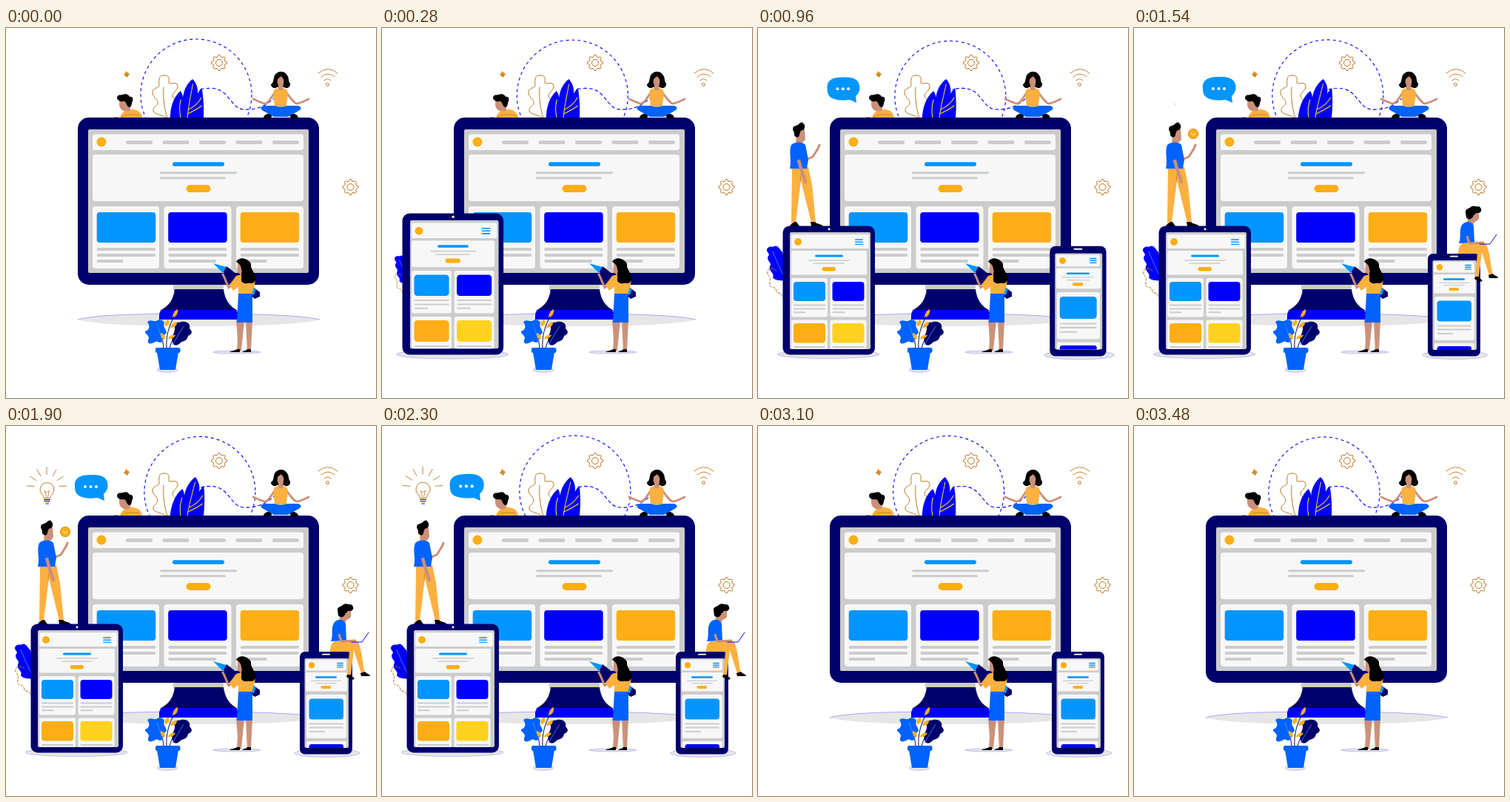
Write an HTML page that moves like this. It is 500 by 500 pixels and loops after 3500 ms.

```html
<!DOCTYPE html>
<html lang="en">
<head>
<meta charset="utf-8">
<title>Responsive devices</title>
<style>
html, body { margin: 0; width: 100%; height: 100%; overflow: hidden; background: #fff; }
svg { display: block; width: 500px; height: 500px; }
</style>
</head>
<body>
<svg id="stage" viewBox="0 0 500 500"></svg>
<script>
const LOOP = 3500;
const NAVY = '#00006c', BLUE = '#0000ff', LAKE = '#0062ff', SKY = '#0095ff',
  ORANGE = '#fdae17', CLOTH = '#fcb040', YELLOW = '#ffd21f', GREY = '#ccc', PANEL = '#f7f7f7',
  SHADE = '#e6e6e6', SKIN = '#cc9078', BROWN = '#b97526', BLACK = '#000';

// Drawing helpers; boxes are given by their edges.
const box = (x, y, x2, y2, fill, r = 0) =>
  `<rect x="${x}" y="${y}" width="${x2 - x}" height="${y2 - y}" rx="${r}" fill="${fill}"/>`;
const bar = (x, x2, y, h = 3, fill = GREY) => box(x, y - h / 2, x2, y + h / 2, fill, h / 2);
const dot = (x, y, r, fill) => `<circle cx="${x}" cy="${y}" r="${r}" fill="${fill}"/>`;
const ring = (x, y, r, color, extra = '') =>
  `<circle cx="${x}" cy="${y}" r="${r}" fill="none" stroke="${color}" ${extra}/>`;
const oval = (x, y, rx, ry, fill, extra = '') =>
  `<ellipse cx="${x}" cy="${y}" rx="${rx}" ry="${ry}" fill="${fill}" ${extra}/>`;
const shadow = (x, y, rx, ry) => oval(x, y, rx, ry, SHADE, 'stroke="#8a8af0" stroke-width=".5"');
const shape = (d, fill) => `<path d="${d}" fill="${fill}"/>`;
const line = (d, color, w = 1, extra = '') =>
  `<path d="${d}" fill="none" stroke="${color}" stroke-width="${w}" stroke-linecap="round" stroke-linejoin="round" ${extra}/>`;
const group = (id, body) => `<g id="${id}">${body}</g>`;

function gear(x, y) {
  let d = '';
  for (let i = 0; i < 32; i++) {
    const r = i % 4 < 2 ? 10.6 : 8.2, a = (i - 0.5) * Math.PI / 16;
    d += (i ? 'L' : 'M') + (x + r * Math.cos(a)).toFixed(1) + ' ' + (y + r * Math.sin(a)).toFixed(1);
  }
  return line(d + 'Z', BROWN) + ring(x, y, 4.5, BROWN);
}

function monitor() {
  let s = shape('M97 394C120 387 190 386 260 386S400 388 424 394C400 401 330 403 260 403S120 401 97 394Z', SHADE) +
    line('M97 394C120 387 190 386 260 386S400 388 424 394', '#8a8af0', .7) +
    box(226, 346, 294, 355, GREY) +
    shape('M228 353H294C296 367 301 375 313 382H208C221 375 226 367 228 353Z', NAVY) +
    shape('M211 381H310Q314 383 314 388V394H207V388Q207 383 211 381Z', BLUE) +
    box(97, 121, 423, 347, NAVY, 15) + box(111, 137, 409, 331, GREY, 2) +
    box(117, 143.5, 402, 165, PANEL, 3) + dot(129, 154, 6.5, ORANGE);
  for (let i = 0; i < 5; i++) s += bar(162 + i * 49.5, 198 + i * 49.5, 154.5, 5);
  s += box(117, 171, 402, 234, PANEL, 4) + bar(225, 295, 184, 5.5, SKY) +
    bar(208, 312, 195.7) + bar(208, 297, 202.8) + box(243.5, 212, 276.5, 222, ORANGE, 5);
  [[117, 207, SKY, 36], [213.5, 304.5, BLUE, 65], [311, 402, ORANGE, 36]].forEach(([x, x2, fill, w]) => {
    const a = x + 5.7;
    s += box(x, 241, x2, 325, PANEL, 4) + box(a, 249, a + 79.5, 290, fill, 4) +
      bar(a, a + 79.5, 299, 4) + bar(a, a + 79.5, 307, 4) + bar(a, a + w, 315, 4);
  });
  return s;
}

const menu = (x, x2, y, gap) => [0, 1, 2].map(i => bar(x, x2, y + i * gap, 1.4, SKY)).join('');

function tablet() {
  let s = shadow(95, 441, 69, 5.5) + box(33.5, 267.5, 158, 441.5, NAVY, 9) + dot(96, 271.7, 1.5, '#fff') +
    box(43, 276, 152, 434, GREY, 2) + box(45, 279, 150, 298, PANEL, 2) + dot(54, 289, 5, ORANGE) +
    menu(131, 142, 286, 3.2) + box(45, 301, 147, 333.5, PANEL, 2) + bar(77, 115, 308, 3, SKY) +
    bar(68, 124, 314, 1.5) + bar(74, 117, 318, 1.5) + box(86.5, 323, 105, 328.5, ORANGE, 2.7);
  [[45, SKY, ORANGE], [97.5, BLUE, YELLOW]].forEach(([x, top, low]) => {
    const a = x + 3;
    s += box(x, 338, x + 49, 390.5, PANEL, 3) + box(a, 343, a + 43, 369, top, 4) +
      bar(a, a + 43, 374.5, 2) + bar(a, a + 43, 379.5, 2) + bar(a, a + 17, 384.3, 2) +
      box(x, 394.5, x + 49, 434, PANEL, 3) + box(a, 399, a + 43, 425.5, low, 4) + bar(a, a + 43, 431, 2);
  });
  return s;
}

function phone() {
  return shadow(434, 442, 44, 5.5) + box(397, 305, 468, 443.5, NAVY, 7) + bar(427, 438, 308.7, 1.8, '#fff') +
    box(403.5, 314, 463, 435, GREY, 2) + box(405, 316, 460, 330.5, PANEL, 2) + dot(413, 323.3, 4.2, ORANGE) +
    menu(447, 456, 320.5, 2.7) + box(405, 333, 461, 358.5, PANEL, 2) + bar(418, 447, 339.5, 2.4, SKY) +
    bar(412, 453, 344.3, 1.2) + bar(418, 447, 347.7, 1.2) + box(425.5, 351, 439, 355, ORANGE, 2) +
    box(406, 363, 460, 422, PANEL, 3) + box(409.5, 368.5, 456, 396.5, SKY, 4) +
    bar(409.5, 456, 402.5, 2) + bar(409.5, 456, 407.5, 2) + bar(409.5, 431, 413, 2) +
    box(406, 426, 460, 435, PANEL, 2) + shape('M409.5 435V433Q410 430 413 430H453Q456 430 456 433V435Z', BLUE);
}

const leaves = () =>
  shape('M222 122C222 110 226 94 237 85C239 88 240 91 240 94C242 83 246 75 254 69C260 76 261 83 260 89C262 85 264 83 266 81C268 95 268 110 267 122Z', BLUE) +
  line('M236 121C234 112 235 104 237 97M245 121C247 105 251 90 254 76M247 110C254 107 261 101 265 94M246 116C254 112 260 109 265 105', YELLOW, 1.1);

const sketch = () => line('M216 121C208 116 199 117 199 111C199 106 206 105 205 100C204 95 197 92 198 86C199 80 207 82 207 77C206 69 207 64 213 64C220 63 221 68 220 73C219 78 231 71 232 78C233 84 225 87 225 92C226 97 232 96 231 103C230 110 222 113 222 121M218 121C214 110 212 95 213 80', BROWN);

const peeker = () =>
  shape('M154 122C155 114 162 110 170 110C179 110 184 115 184 122Z', CLOTH) +
  shape('M153 96H167L168 111C161 115 154 111 153 104Z', SKIN) +
  shape('M150 94C151 89 156 91 158 90C162 88 166 90 167 93C171 92 173 97 170 101C170 106 167 109 165 106C162 104 163 99 159 99C155 100 150 98 150 94Z', BLACK) +
  line('M156 121C161 117 169 116 180 118', BROWN, .8) + oval(149, 121.5, 3, 1.8, SKIN);

const yogi = () =>
  line('M365 85C358 93 355 103 349 102C345 101 341 99 334 96M377 85C384 93 389 103 394 102C399 101 403 99 409 96', SKIN, 2.8) +
  shape('M362 84C365 80 377 80 380 84C382 92 379 99 379 106H363C363 99 360 92 362 84Z', CLOTH) +
  shape('M358 76C362 74 361 69 363 64C367 57 377 58 379 63C383 66 381 72 384 75C385 80 379 83 376 80H366C363 83 358 80 358 76Z', BLACK) +
  shape('M368 75H374.5V82C372 85 370 85 368 82Z', SKIN) +
  oval(371, 72.5, 4.3, 7, SKIN) + shape('M365 70C368 68 371 66 372 64C374 68 376 69 377 72L380 64L371 59L364 63Z', BLACK) +
  shape('M348 121C349 116 355 115 360 116L358 122H350ZM395 121C394 116 388 115 383 116L385 122H393Z', BLACK) +
  shape('M363 105L348 105Q342 108 346 111L362 120H381L397 111Q401 107 395 105L380 105Q371 108 363 105Z', LAKE);

const designer = () => shadow(312, 438, 32, 2) +
  shape('M293 329L298 322L343 357V363L336 366Z', NAVY) + shape('M280 318L298 323L293 331Z', SKY) +
  shape('M328 347L338 353L335 361L328 358Z', SKY) +
  shape('M311 395H322L318 436H312L313 420ZM324 395H333L331 436H326Z', SKIN) +
  shape('M302 438C305 436 310 436 312 434H316V438ZM319 438C322 436 325 436 326 434H331V438Z', BLACK) +
  line('M310 342L301 351L295 337L293 333', SKIN, 3) +
  shape('M302 347L311 335C317 332 330 333 336 340C338 347 333 352 333 360H314V350L307 355Z', CLOTH) +
  shape('M314 359H333L333 398H312Z', LAKE) + shape('M313 317H322V334C320 338 316 335 316 332L313 331Z', SKIN) +
  shape('M311 316C314 310 323 310 328 315C333 318 330 322 332 325C334 331 341 336 336 342C334 347 328 344 326 345C321 346 317 343 318 338C319 335 317 333 319 329C317 326 320 321 311 316Z', BLACK);

const potted = () => shadow(218, 462, 14, 3.3) +
  line('M217 433C216 417 220 401 228 389M213 433C212 420 209 412 201 404M221 433C224 420 231 410 241 404', NAVY) +
  shape('M191 397C196 393 199 397 203 396C207 393 213 394 214 399C211 403 217 407 217 412C211 416 215 419 211 424C207 427 205 422 202 424C197 427 191 428 192 422C196 415 187 414 188 410C194 408 195 403 191 397Z', LAKE) +
  shape('M227 401C229 396 233 399 237 397C243 396 250 399 248 406C253 411 251 414 246 416C245 423 239 423 236 425C230 432 224 428 225 422C222 416 231 411 227 401Z', NAVY) +
  line('M204 401L213 426M240 403L225 428', '#4fa6ff', .7) +
  shape('M225 391C226 384 229 381 232 380C233 386 230 390 225 391ZM215 403C214 398 216 396 219 394C222 398 220 402 215 403ZM222 405C224 399 228 397 231 398C231 403 227 405 222 405ZM214 421C209 419 209 415 209 412C214 413 216 417 214 421ZM219 420C221 415 225 414 229 415C227 419 223 421 219 420Z', ORANGE) +
  box(202, 432, 235.5, 439, LAKE, 2) + shape('M204 438H233L229 462H208Z', LAKE);

const standing = () =>
  line('M65 178L74 174L81 163L83 158', SKIN, 3) +
  shape('M46 188H68L73 212L78 263H72L58 206L51 263H45Z', CLOTH) +
  line('M59 192L57 208', BROWN, .6) +
  shape('M43 268C45 263 50 262 52 262L56 268ZM71 262H77C79 265 85 264 88 268H72Z', BLACK) +
  shape('M52 137H63L64 150C62 155 58 154 58 160L51 160Z', SKIN) +
  shape('M43 190C46 178 41 167 45 158C51 153 61 154 64 158L68 178L66 190Z', LAKE) +
  line('M54 175L58 190L64 208', SKIN, 4.5) + shape('M47 160C53 160 57 167 58 177L50 180Z', LAKE) +
  shape('M47 137C47 131 52 133 55 130C58 127 61 127 61 129C65 131 63 138 60 138C56 139 57 143 55 147C51 149 48 145 49 142Z', BLACK);

const sitter = () =>
  shape('M438 305C438 298 440 292 445 291L474 291C480 294 481 315 485 334H480L470 303L466 337H461L464 305Z', CLOTH) +
  shape('M461 336H466L471 342L467 343L460 339ZM479 334L485 332C487 335 492 335 492 338H480Z', BLACK) +
  shape('M454 247H466V258C464 262 459 260 459 266L450 263Z', SKIN) +
  shape('M439 291C443 282 438 273 444 265C449 260 456 261 459 267L460 290Z', LAKE) +
  line('M449 278L453 291L472 290', SKIN, 3) + shape('M443 266C450 266 452 274 453 280L445 283Z', LAKE) +
  shape('M448 249C448 243 453 245 456 241C461 239 463 242 466 241C471 244 470 249 466 250C461 249 461 252 459 253C457 259 452 260 449 256Z', BLACK) +
  line('M467 292H481L490 279', BLUE, 1);

const backPlant = () =>
  shape('M12 299C15 293 19 297 22 295C27 293 29 299 33 303L42 342C33 341 22 342 20 337C23 331 14 329 16 322C20 317 10 314 14 308C17 305 11 303 12 299Z', BLUE) +
  line('M20 302C25 315 31 328 36 338', '#4fa6ff', .7) +
  line('M36 365C31 365 34 359 28 358C23 359 27 352 20 350C14 350 16 345 16 341C19 336 11 334 13 328C16 323 22 325 25 328', BROWN, 1, 'stroke-dasharray="3 2"');

const bubble = () =>
  shape('M93 82C92 70 100 66 115 66C131 65 138 71 137.5 81C137 87 135 89 132 92L133 101L124 97C116 98 108 98 103 96C96 94 93 90 93 82Z', SKY) +
  [107, 114.5, 122].map(x => dot(x, 82, 2, '#fff')).join('');

function bulb() {
  let rays = '';
  for (let i = -3; i <= 3; i++) {
    const a = i * 29 * Math.PI / 180, x = Math.sin(a), y = -Math.cos(a);
    rays += `M${55 + 17 * x} ${82 + 17 * y}L${55 + 27 * x} ${82 + 27 * y}`;
  }
  return line(rays, BROWN, .9) +
    line('M51 97C51 92 46 92 46 86C46 73 65 73 65 86C65 92 60 92 60 97Z', BROWN) +
    line('M54.5 96L52.5 87L55.5 90L58.5 87L56.5 96', BROWN, .8) +
    line('M51.5 99.5H59.5M52 102H59', NAVY, 1.2) + line('M54 105H57.5', BLUE, 1.2);
}

const coin = () => dot(80, 143, 7, ORANGE) + ring(80, 143, 6.5, '#dc8e12') +
  line('M77 142L79.5 145L83 142', '#fff', 1);

const extras = () =>
  shape('M162 58L164 60L167 62L165 65L164 67L161 65L159 63L161 61Z', '#d98b1e') + gear(288, 47) + gear(465.5, 215) +
  line('M422 61Q435 50 448 61M426 66Q435 58 444 66M430 71Q434.5 66.5 439 71', BROWN, .9) +
  ring(434.5, 76.5, 2, BROWN);

const DASH = 'stroke-dasharray="4 4"';
const orbit = () => ring(259.5, 90, 75, BLUE, 'stroke-width="1.1" ' + DASH);
const tail = () => line('M263 83C281 79 290 83 297 90C307 101 311 110 322 110C337 111 355 106 370 86', BLUE, 1.1, DASH);

const $ = id => document.getElementById(id);
$('stage').innerHTML = extras() + group('orbit', orbit()) + group('tail', tail()) + sketch() +
  group('leaves', leaves()) + peeker() + monitor() + yogi() + group('backPlant', backPlant()) +
  group('standing', standing()) + group('tablet', tablet()) + group('phone', phone()) +
  group('sitter', sitter()) + group('bubble', bubble()) + group('bulb', bulb()) + group('coin', coin()) +
  potted() + designer();

const linear = t => t;
const backIn = t => 2.7 * t ** 3 - 1.7 * t * t;
const backOut = t => 1 - backIn(1 - t);
const elastic = t => t <= 0 ? 0 : t >= 1 ? 1 : 1 - 2 ** (-10 * t) * Math.cos(t * Math.PI * 2 / 0.3);

// id, pivot x, y, then start, length and easing of the entrance and of the exit
const pops = [
  ['tablet', 95, 441, 10, 440, backOut, 2700, 195, linear],
  ['backPlant', 38, 362, 200, 330, backOut, 2470, 220, backIn],
  ['standing', 62, 267, 300, 360, backOut, 2440, 250, backIn],
  ['phone', 433, 442.5, 645, 440, backOut, 3165, 270, linear],
  ['bubble', 132, 100, 720, 400, elastic, 2260, 260, backIn],
  ['sitter', 462, 304, 1000, 600, elastic, 2900, 200, linear],
  ['bulb', 55, 104, 1536, 600, elastic, 2320, 260, backIn],
  ['coin', 80, 143, 1330, 190, backOut, 2110, 50, linear]
];
const part = (t, start, length) => Math.min(1, Math.max(0, (t - start) / length));

function draw(t) {
  const a = t / LOOP * Math.PI * 2;
  $('orbit').setAttribute('transform', `translate(${-2.5 * Math.cos(a)} ${2.5 * Math.sin(a)})`);
  $('tail').setAttribute('stroke-dashoffset', -16 * t / LOOP);
  $('leaves').setAttribute('transform', `translate(0 121) skewX(${2 * Math.cos(a)}) translate(0 -121)`);
  for (const [id, x, y, t0, d0, e0, t1, d1, e1] of pops) {
    const s = t < t1 ? e0(part(t, t0, d0)) : 1 - e1(part(t, t1, d1));
    const drop = id === 'coin' ? 61 * part(t, 1940, 200) ** 2 : 0;
    const el = $(id);
    el.style.display = s > 0.005 ? '' : 'none';
    el.setAttribute('transform', `translate(${x} ${y + drop}) scale(${s}) translate(${-x} ${-y})`);
  }
}

const begin = performance.now();
function tick() {
  draw((performance.now() - begin) % LOOP);
  requestAnimationFrame(tick);
}
tick();
</script>
</body>
</html>
```
